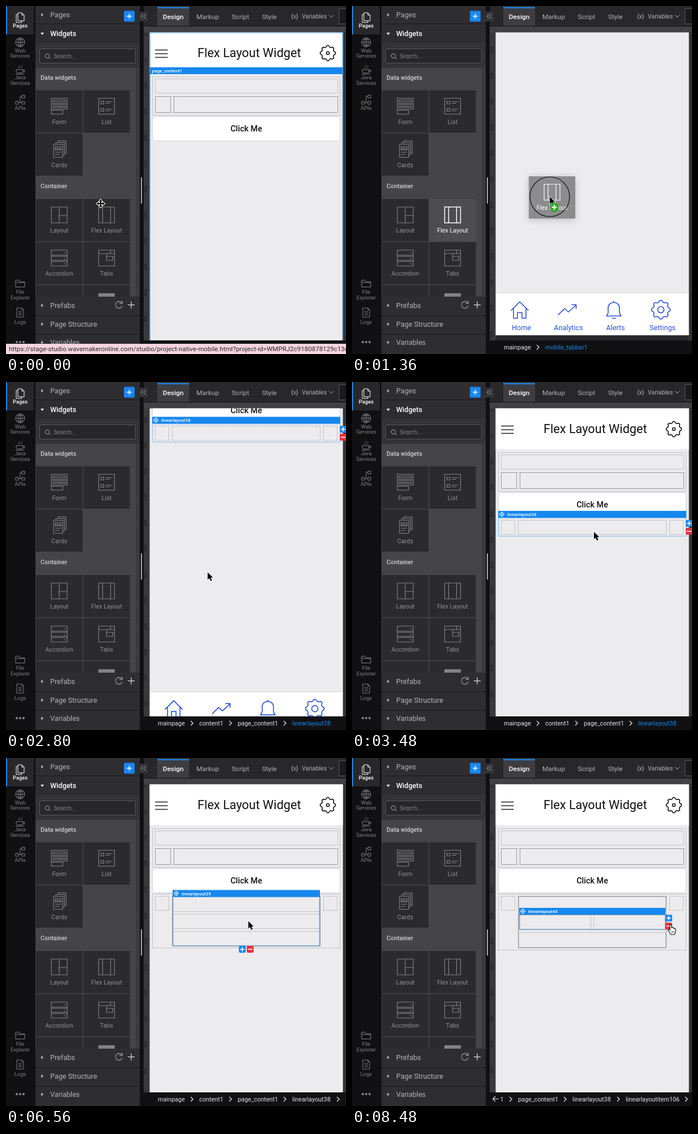
Recreate the animation shown at these times as an HTML page. Size 600 px wide and 613 px high, loop 8520 ms.

```html
<!DOCTYPE html>
<html lang="en">
<head>
<meta charset="utf-8">
<title>Flex layout editor</title>
<style>
html, body { margin: 0; width: 100%; height: 100%; overflow: hidden; background: #111; }
svg { display: block; width: 600px; height: 613px; font-family: Roboto, sans-serif; }
text { white-space: pre; }
</style>
</head>
<body>
<svg viewBox="0 0 600 613">
  <defs>
    <clipPath id="list"><path d="M52 109H236V512H52Z"/></clipPath>
    <clipPath id="page"><path d="M253.5 46.5H594.5V589H253.5Z"/></clipPath>
    <clipPath id="work"><path d="M243 46H600V589H243Z"/></clipPath>
    <clipPath id="crumbs"><path d="M243 589H600V613H243Z"/></clipPath>
    <filter id="shadow" x="-40%" y="-40%" width="180%" height="180%">
      <feDropShadow dx="0" dy="2" stdDeviation="7" flood-opacity=".2"/>
    </filter>
  </defs>
  <g id="base"></g><g id="live"></g>
</svg>
<script>
const LOOP = 8520, BLUE = '#1687ee', SOFT_BLUE = '#4da3ee', TAB_BLUE = '#2a50d6';
const $ = id => document.getElementById(id);

const rect = (x, y, w, h, fill, more = '') =>
  `<rect x="${x}" y="${y}" width="${w}" height="${h}" fill="${fill}" ${more}/>`;
const text = (x, y, s, size, fill, more = '') =>
  `<text x="${x}" y="${y}" font-size="${size}" fill="${fill}" ${more}>${s}</text>`;
const line = (d, color, width = 1, fill = 'none', more = '') =>
  `<path d="${d}" stroke="${color}" stroke-width="${width}" fill="${fill}" ${more}/>`;
const at = (x, y, s, more = '') => `<g transform="translate(${x} ${y})" ${more}>${s}</g>`;
const ring = (x, y, r, color, width = 1) =>
  `<circle cx="${x}" cy="${y}" r="${r}" fill="none" stroke="${color}" stroke-width="${width}"/>`;
const MID = 'text-anchor="middle"', BOLD = 'font-weight="500"';

const dotted = (x, y, w, h, color = '#99999d', dash = '1 1') =>
  rect(x + .5, y + .5, w - 1, h - 1, 'none', `stroke="${color}" stroke-dasharray="${dash}"`);
const boxed = (x, y, w, h, color = '#aaaaae') =>
  rect(x + .5, y + .5, w - 1, h - 1, 'none', `stroke="${color}"`) + dotted(x, y, w, h, '#89898d');

function gear(x, y, r, hole, color, width) {
  const points = [];
  for (let i = 0; i < 32; i++) {
    const a = (i - 1.5) * Math.PI / 16, k = i % 4 === 1 || i % 4 === 2 ? r : r * .82;
    points.push((Math.sin(a) * k).toFixed(2) + ' ' + (-Math.cos(a) * k).toFixed(2));
  }
  return at(x, y, line('M' + points.join('L') + 'Z', color, width, 'none', 'stroke-linejoin="round"') +
    ring(0, 0, hole, color, width));
}

const ICONS = {
  Form: 'M-14-14H14V-5H-14ZM-11-11H11V-8H-11ZM-14-3H14V5H-14ZM-11 0H11V2H-11ZM-14 7H6V14H-14Z',
  List: 'M-14-14H14V14H-14ZM-10-9H-5V-4H-10ZM-2-8H10M-2-5H6M-10 4H-5V9H-10ZM-2 5H10M-2 8H6',
  Cards: 'M-10-9V14H6V-9ZM-6-9V-12H9V10H6M-2-12V-15H12V7H9M-7 1H3V-5H-7ZM-7 0L-3-3 0 0 3-2M-7 5H3M-7 9H0',
  Layout: 'M-14-14H14V14H-14ZM0-14V14M0 1H14',
  'Flex Layout': 'M-14-14H14V14H-14ZM-7-14V14M7-14V14',
  Accordion: 'M-14-14H14V-5H-14ZM-14-5V14H14V-5M-14-3H14M-14 4H14M-14 6H14M8-9H11M8 1H11M8 10H11',
  Tabs: 'M-14-14H14V14H-14ZM-14-8H14M0-8V4H11V-3H0M7-14V-8'
};

const tile = (x, y, name, bg, ink, label, more = '', width = 1.15) =>
  rect(x, y, 82, 74.5, bg, more) +
  at(x + 41, y + 28, line(ICONS[name] || '', ink, width)) +
  text(x + 41, y + 59, name, 10.8, label, MID);

function railItem(y, icon, labels, labelY, color = '#828284', weight = '') {
  return at(25, y, line(icon, color, 1)) +
    labels.map((s, i) => text(25, labelY + i * 9.6, s, 9.3, color, MID + ' ' + weight)).join('');
}

function section(y, name, open) {
  const arrow = open ? 'M61 -6H67L64 -2Z' : 'M62 -7.5V-1.5L66.5 -4.5Z';
  return at(0, y, `<path d="${arrow}" fill="${open ? '#fff' : '#a9a9ab'}"/>` +
    text(78, 0, name, 12.6, open ? '#fff' : '#b4b4b6', open ? BOLD : ''));
}

function drawBase() {
  const sheet = 'M-4-8H3L7-4V6H-4ZM3-8V-4H7M-4-5H-7V9H3V6';
  const globe = 'M-8 0A8 8 0 1 0 8 0A8 8 0 1 0-8 0H8M0-8V8M-6-5H6M-6 5H6M0-8C-5-4-5 4 0 8C5 4 5-4 0-8';
  const cup = 'M-7 0H5V3Q5 6 1 6H-3Q-7 6-7 3ZM5 1H8V4H5M-8 8H7M-2-2C-5-5 2-6-1-8M2-2C0-4 5-5 3-7';
  const api = 'M-8 2H-3V7H-8ZM3-9H8V-4H3ZM3 2H8V7H3ZM-3 4H0V-7H3M0 4H3';
  const folder = 'M-8-6H-2L0-3H8V6H-8ZM-8-2H8';
  const log = 'M-6-8H3L6-5V8H-6ZM3-8V-5H6M-3-2H3M-3 1H3M-3 4H3';
  let s = rect(0, 0, 600, 613, '#111113') +
    rect(0, 0, 49, 50, '#28282b') + rect(0, 0, 2, 50, BLUE) +
    railItem(20, sheet, ['Pages'], 38, '#fff', BOLD) +
    railItem(64, globe, ['Web', 'Services'], 81.5) +
    railItem(112, cup, ['Java', 'Services'], 129) +
    railItem(166, api, ['APIs'], 183) +
    railItem(489, folder, ['File', 'Explorer'], 507) +
    railItem(540, log, ['Logs'], 560) +
    [19, 25, 31].map(x => `<circle cx="${x}" cy="592" r="2" fill="#8a8a8c"/>`).join('');

  // Widget panel
  s += rect(52, 0, 184, 613, '#2e2d30') + rect(52, 31, 184, 1, '#19191b') +
    section(20, 'Pages') + section(53, 'Widgets', true) +
    rect(208, 8.5, 19, 19, BLUE, 'rx="2"') + line('M213 18H222M217.5 13.5V22.5', '#fff', 1.5) +
    rect(52, 65, 184, 44, '#343336') +
    rect(59.5, 75.5, 169, 25, '#272629', 'rx="2" stroke="#575659"') +
    ring(73, 88, 3.8, '#aaa') + line('M76 91L79 94', '#aaa') +
    text(84, 92, 'Search...', 10.2, '#858487');
  let list = rect(52, 109, 184, 403, '#454446') + rect(229, 109, 7, 403, '#3b3a3c') +
    text(61, 130, 'Data widgets', 10.8, '#d0d0d2', BOLD) +
    text(61, 321, 'Container', 10.8, '#d0d0d2', BOLD);
  [['Form', 53, 148.5], ['List', 136.5, 148.5], ['Cards', 53, 224.5], ['Layout', 53, 340],
   ['Accordion', 53, 416], ['Tabs', 136.5, 416], ['', 53, 492], ['', 136.5, 492]]
    .forEach(([name, x, y]) => list += tile(x, y, name, '#2b2a2c', '#838285', '#929194'));
  s += `<g clip-path="url(#list)">${list}${rect(163, 506, 29, 8, '#838285')}</g>`;
  s += rect(52, 545, 184, 1, '#19191b') + rect(52, 578, 184, 1, '#19191b') +
    section(532, 'Prefabs') + section(565, 'Page Structure') + section(597, 'Variables') +
    line('M204.5 523.5A6 6 0 1 0 205 528M205 519V524H200', '#aaa', 1.1) +
    line('M215 526.5H227M221 520.5V532.5', '#c4c4c6', 1.5);

  // Work area
  s += rect(236, 0, 364, 613, '#111113') + rect(243, 0, 357, 35, '#28282b') +
    rect(243, 36, 357, 553, '#414145') + rect(243, 46, 10, 543, '#39393c') +
    rect(595, 46, 5, 543, '#333335') +
    rect(236, 10, 14, 17, '#343437') + line('M241.5 14L238.5 18 241.5 22M246 14L243 18 246 22', '#aaa') +
    rect(238, 302, 2, 46, '#aaaaac') +
    rect(267, 0, 56, 35, '#3e3e42') + rect(267, 2, 56, 2, BLUE) +
    text(295, 22.5, 'Design', 11.8, '#fff', MID + ' ' + BOLD) +
    text(336, 22.5, 'Markup', 11.8, '#b2b2b4') + text(398.5, 22.5, 'Script', 11.8, '#b2b2b4') +
    text(452, 22.5, 'Style', 11.8, '#b2b2b4') + text(503, 22, '{x}', 10.8, '#b2b2b4') +
    text(522, 22, 'Variables', 10.7, '#b2b2b4') + line('M570 16L574 20 578 16', '#b2b2b4') +
    rect(587.5, 4.5, 20, 27, '#1b1b1d', 'rx="2" stroke="#5a5a5d"');
  $('base').innerHTML = s;
}

// Eased value along [time, ...values] keys
function track(keys, t) {
  let i = keys.findIndex(k => k[0] > t);
  if (i < 0) i = keys.length;
  const a = keys[Math.max(0, i - 1)], b = keys[Math.min(i, keys.length - 1)];
  let p = b[0] > a[0] ? (t - a[0]) / (b[0] - a[0]) : 0;
  p *= p * (3 - 2 * p);
  return a.slice(1).map((v, j) => v + (b[j + 1] - v) * p);
}
const POINTER = [[0, 167, 348], [480, 173, 375], [620, 173, 375], [880, 240, 362], [1360, 349, 336],
  [1800, 350, 341], [2680, 350, 341], [3400, 427, 264], [3960, 427, 264], [4480, 423, 273],
  [4840, 423, 273], [5320, 416, 305], [5880, 416, 305], [6640, 428, 287], [6920, 428, 287],
  [7360, 556, 287], [7880, 556, 287], [8400, 561, 294]];
const SCROLL = [[0, 0], [920, 0], [1320, 200], [1800, 200], [1920, 192], [2680, 192], [3200, 0]];

const grip = 'M-4 0H4M0-4V4M-2.5-2.5L0-4 2.5-2.5M-2.5 2.5L0 4 2.5 2.5M-2.5-2.5L-4 0-2.5 2.5M2.5-2.5L4 0 2.5 2.5';
const label = (x, y, w, name, movable = true) => rect(x, y, w, 12, BLUE) +
  (movable ? at(x + 6.5, y + 6, line(grip, '#fff', .9)) : '') +
  text(x + (movable ? 16 : 4.5), y + 9, name, 8.1, '#fff', BOLD);
const button = (x, y, minus) => rect(x - 6, y - 6, 12, 12, minus ? '#e8323c' : BLUE, 'rx="2"') +
  line(`M${x - 4} ${y}H${x + 4}` + (minus ? '' : `M${x} ${y - 4}V${y + 4}`), '#fff', 1.5);

function flexWidget(t) {
  const nested = t >= 4800, three = t >= 5560, split = t >= 7800;
  const bottom = split ? 339 : three ? 335 : nested ? 306 : 272;
  let s = t < 3920 ? dotted(258, 239, 332, 33, SOFT_BLUE, '2 1') : dotted(258, 239, 332, bottom - 239);
  s += dotted(263, 243, 25, 26) + dotted(560, 243, 25, 26);
  if (!nested) {
    s += t < 3920 ? dotted(293, 243, 262, 26) : dotted(293, 243, 262, 26, SOFT_BLUE, '2 1');
    return s + (t < 3920
      ? label(258, 227, 332, 'linearlayout38') + button(595, 249) + button(595, 263, true)
      : label(294, 231, 260, 'linearlayoutitem106') + button(560, 256) + button(424, 275));
  }
  s += boxed(293, 243, 262, bottom - 4 - 243) + dotted(294, 244, 260, 27);
  s += split ? dotted(294, 307, 260, 27) : dotted(294, 275, 260, 26) + (three ? dotted(294, 305, 260, 26) : '');
  if (t < 6920) {
    const y = three ? 331 : 301;
    return s + rect(294.5, 244.5, 259, y - 244.5, 'none', 'stroke="#6d9fcc" stroke-width="1.5"') +
      label(294, 232.5, 260, 'linearlayout39') + button(417, y + 6) + button(431, y + 6, true);
  }
  if (!split) return s + dotted(294, 274, 260, 26, SOFT_BLUE, '2 1') +
    label(294, 263, 260, 'linearlayoutitem109') + button(559, 287) + button(424, 305);
  return s + rect(295, 276, 258, 26, 'none', 'stroke="#6d9fcc" stroke-width="1.5"') +
    dotted(296, 276, 126, 26) + dotted(426, 276, 127, 26) +
    label(295, 264, 258, 'linearlayout40') + button(559, 282) + button(559, 296, true);
}

function tabBar(y) {
  const icon = (x, d) => at(x, y + 30, line(d, TAB_BLUE, 1.6, 'none', 'stroke-linejoin="round" stroke-linecap="round"'));
  return rect(253, y, 342, 75, '#fff') + rect(253, y, 342, 1, '#dddde0') +
    icon(296, 'M-15 1L0-14 15 1M-11-2V15H-4V5H4V15H11V-2') +
    icon(380, 'M-16 9L-5-2 2 4 15-8M8-9H15.5V-2') +
    icon(462, 'M-13 11C-9 7-10 3-10-3C-10-16 10-16 10-3C10 3 9 7 13 11ZM-3 15H3M0-15V-13') +
    gear(545, y + 30, 16.5, 5.5, TAB_BLUE, 1.6) +
    ['Home', 'Analytics', 'Alerts', 'Settings'].map((name, i) =>
      text(299 + i * 83, y + 66, name, 12.6, TAB_BLUE, MID)).join('');
}

function page(t, scroll) {
  const dropped = t >= 1880, tabs = dropped ? 711 : 705;
  let ruler = '';
  for (let i = 0; i < 18; i++)
    ruler += text(0, 0, i * 50, 7, '#1c1c1e', `${MID} transform="translate(249 ${50 + i * 45.5 - scroll}) rotate(-90)"`);
  const content = rect(253, 46, 342, tabs - 46, '#ecebee') +
    rect(253, 46, 342, 73, '#fff') + rect(253, 119, 342, 1, '#d9d9dc') +
    line('M263 77.5H285.5M263 84H285.5M263 90.5H285.5', '#222', 1.4) +
    text(338, 90, 'Flex Layout Widget', 21.7, '#111') + gear(568, 83, 13.5, 2.5, '#111', 1.6) +
    dotted(258, 124, 332, 69) + dotted(263, 128, 323, 26) +
    boxed(263, 159, 28, 29) + boxed(296, 159, 290, 29) + dotted(263, 159, 323, 29) +
    rect(258.5, 195, 331, 42.5, '#fff', 'rx="5" stroke="#d2d2d5"') +
    text(424, 221, 'Click Me', 14.4, '#111', MID + ' ' + BOLD) + tabBar(tabs) +
    rect(253, tabs + 75, 342, 20, '#2a2a2d');
  const selected = t < 960 ? rect(254, 47, 340, 560, 'none', `stroke="${BLUE}"`) +
    label(253, 108, 342, 'page_content1', false) : '';
  return `<g clip-path="url(#work)">${ruler}<g clip-path="url(#page)">${at(0, -scroll, content + selected)}</g>` +
    `${dropped ? at(0, -scroll, flexWidget(t)) : ''}</g>`;
}

function crumbs(t) {
  let names = ['mainpage', 'content1', 'page_content1'], shift = 0;
  if (t >= 960 && t < 1880) names = ['mainpage', 'mobile_tabbar1'];
  if (t >= 1880) names.push('linearlayout38');
  if (t >= 3920) names.push('linearlayoutitem106');
  if (t >= 4800) names.push('linearlayout39');
  if (t >= 6920) shift = 23;
  if (t >= 7800) shift = 116;
  const starts = [268, 341, 409, 505, 599, 719];
  let s = names.map((name, i) => text(starts[i], 604.5, name, 10.8, i === names.length - 1 ? BLUE : '#e6e6e8') +
    (i ? line(`M${starts[i] - 15} 597L${starts[i] - 11} 601 ${starts[i] - 15} 605`, '#e6e6e8', 1.3) : '')).join('');
  s = rect(243, 589, 357, 24, '#111113') + at(-shift, 0, s);
  if (shift) s += rect(243, 590, 19, 23, '#111113') + line('M259 600.5H249M253 596L248.5 600.5 253 605', '#e6e6e8', 1.2);
  return `<g clip-path="url(#crumbs)">${s}</g>`;
}

const CURSORS = {
  move: line('M0-7L3-3.5H1V-1H3.5V-3L7 0 3.5 3V1H1V3.5H3L0 7-3 3.5H-1V1H-3.5V3L-7 0-3.5-3V-1H-1V-3.5H-3Z',
    '#fff', 2, '#000', 'paint-order="stroke"'),
  arrow: line('M0 0V13L3 10.3 5.2 15.2 7.7 14 5.5 9.3H9.5Z', '#fff', 1.4, '#000', 'paint-order="stroke"'),
  hand: line('M0 1C0-1 3-1 3 1V6C3 4 6 4 6 6C6 5 8 5 8 7C8 6 10 6 10 8V12Q10 14 8 17H1.5Q0 14-3 10C-4 8-2 7 0 9.5Z',
    '#000', 1.1, '#fff') + line('M3.2 11V14M5.2 11V14M7.2 11V14', '#000', .7)
};

function pointer(t) {
  const [x, y] = track(POINTER, t);
  if (t >= 560 && t < 1840) {
    const ghost = t < 640 ? '' :
      tile(x - 37, y - 36, 'Flex Layout', '#878688', '#fff', '#fff', 'opacity=".94" filter="url(#shadow)"');
    return ghost + ring(x, y, 35, '#111', 1.2) + at(x, y, CURSORS.arrow +
      `<circle cx="8" cy="18.5" r="8" fill="#35a82d"/>` + line('M3.5 18.5H12.5M8 14V23', '#fff', 2));
  }
  const kind = t < 2720 ? 'move' : t < 4320 ? 'arrow' : t < 5960 ? 'hand' : t < 7160 ? 'arrow' : 'hand';
  const press = t >= 3600 && t < 3720 ? ring(x, y, 20.5, '#111', 1.2) : '';
  return press + at(x, y, CURSORS[kind]);
}

function draw() {
  const t = performance.now() % LOOP, [scroll] = track(SCROLL, t);
  const active = t >= 560 && t < 2640;
  let s = active
    ? tile(136.5, 340, 'Flex Layout', '#4d4c4e', '#fff', '#fff', '', 1.5)
    : tile(136.5, 340, 'Flex Layout', '#2b2a2c', '#838285', '#929194');
  s += page(t, scroll) + crumbs(t);
  if (t < 520) s += rect(0, 595, 600, 18, '#f8d5df') + text(5, 608,
    'https://stage-studio.wavemakeronline.com/studio/project-native-mobile.html?project-id=WMPRJ2c9180878129c13c', 11.55, '#26262a');
  $('live').innerHTML = s + pointer(t);
  requestAnimationFrame(draw);
}
drawBase();
draw();
</script>
</body>
</html>
```
